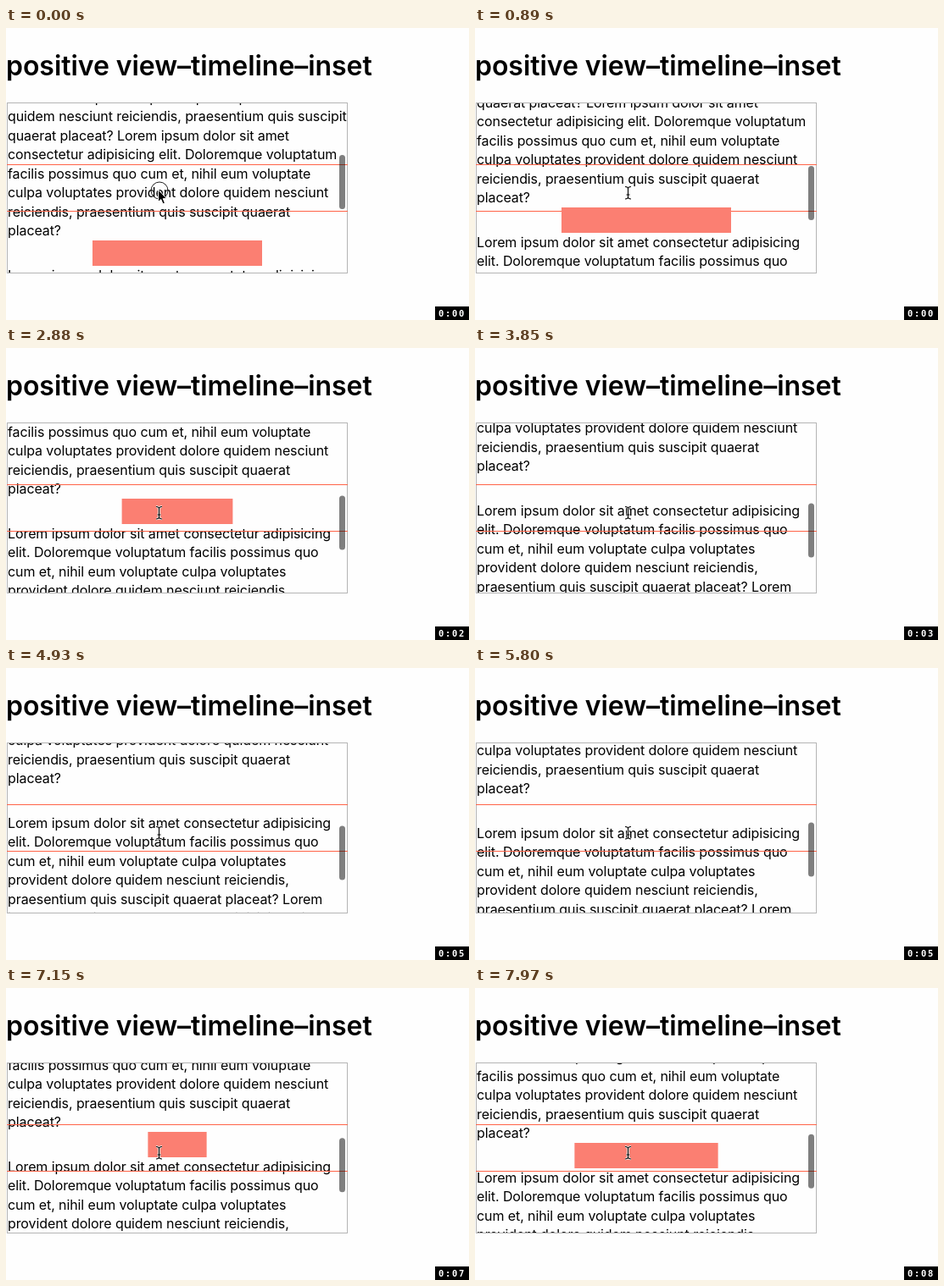
Recreate the animation shown at these times as an HTML page. Size 546 by 345 pixels, loop 8000 ms.

```html
<!DOCTYPE html>
<html lang="en">
<head>
<meta charset="utf-8">
<title>positive view-timeline-inset</title>
<style>
  html, body { margin: 0; width: 100%; height: 100%; overflow: hidden; background: #fefefe; }
  svg { display: block; }
  text { font: 16px Inter, sans-serif; letter-spacing: -.09px; fill: #000; white-space: pre; }
  .title { font-size: 32px; font-weight: 600; letter-spacing: -.05px; }
  .clock { font: bold 10.5px "DejaVu Sans Mono", monospace; letter-spacing: 1.68px; fill: #fff; }
</style>
</head>
<body>
<svg width="546" height="345" viewBox="0 0 546 345">
  <defs>
    <clipPath id="port"><rect x="2" y="89" width="400" height="200"/></clipPath>
    <path id="beamShape" d="M177 187.5Q180.5 187.5 180.5 190Q180.5 187.5 184 187.5M180.5 189.5V200M177 202Q180.5 202 180.5 199.5Q180.5 202 184 202M178.5 197H182.5"/>
  </defs>
  <text class="title" x="0" y="56">positive view–timeline–inset</text>

  <g clip-path="url(#port)"><g id="content"></g></g>
  <rect x="1.5" y="88.5" width="401" height="201" fill="none" stroke="#b4b4b4"/>
  <path d="M1 161.5H403M1 216.5H403" stroke="#ff6347"/>
  <g clip-path="url(#port)"><rect id="subject" height="30" fill="#fb7f72"/></g>
  <rect id="thumb" x="393" width="7" height="64" rx="3.5" fill="#000" fill-opacity=".5"/>

  <g id="pointer">
    <circle cx="181" cy="192" r="10" fill="none" stroke="#222"/>
    <path d="M179.5 191V205.5L182.8 202.5L185 207.8L187.4 206.8L185.2 201.6H189.6Z" stroke="#fff"/>
  </g>
  <g id="beam" fill="none">
    <use href="#beamShape" stroke="#fff" stroke-width="2.6"/>
    <use href="#beamShape" stroke="#000" stroke-width="1.1"/>
  </g>

  <rect x="506" y="329" width="40" height="16"/>
  <text class="clock" id="clock" x="510" y="341"></text>
</svg>
<script>
const LOOP = 8000, LINE = 22.5, START_TOP = 251;
const byId = id => document.getElementById(id);

const before = [
  "nihil eum voluptate culpa voluptates provident dolore",
  "quidem nesciunt reiciendis, praesentium quis suscipit",
  "quaerat placeat? Lorem ipsum dolor sit amet",
  "consectetur adipisicing elit. Doloremque voluptatum",
  "facilis possimus quo cum et, nihil eum voluptate",
  "culpa voluptates provident dolore quidem nesciunt",
  "reiciendis, praesentium quis suscipit quaerat",
  "placeat?"
];
const after = [
  "Lorem ipsum dolor sit amet consectetur adipisicing",
  "elit. Doloremque voluptatum facilis possimus quo",
  "cum et, nihil eum voluptate culpa voluptates",
  "provident dolore quidem nesciunt reiciendis,",
  "praesentium quis suscipit quaerat placeat? Lorem",
  "ipsum dolor sit amet consectetur adipisicing elit."
];

// Baselines are relative to the top edge of the subject.
function addLines(lines, firstBaseline) {
  lines.forEach((line, i) => {
    const text = document.createElementNS("http://www.w3.org/2000/svg", "text");
    text.setAttribute("x", 2);
    text.setAttribute("y", firstBaseline + i * LINE);
    text.textContent = line;
    byId("content").append(text);
  });
}
addLines(before, -6 - (before.length - 1) * LINE);
addLines(after, 46.5);

// Scroll bursts: start, end, resting top of the subject.
const bursts = [
  [50, 490, 224], [730, 1200, 204], [1440, 1690, 197], [1900, 2350, 189],
  [2680, 2950, 177], [3430, 3970, 150], [4210, 4400, 137], [4820, 5130, 145],
  [5340, 5590, 152], [5800, 6130, 163], [6370, 6480, 166], [6780, 6910, 169],
  [7150, 7280, 173], [7610, 7970, 183]
];
const STEP = 30;

function subjectTop(t) {
  let top = START_TOP;
  for (const [start, end, rest] of bursts) {
    if (t < start) break;
    const p = Math.min(1, (t - start + STEP) / (end - start + STEP));
    top += (rest - top) * (1 - (1 - p) ** 2);
  }
  return Math.round(top);
}

function draw(t) {
  const top = subjectTop(t);
  const width = 200 * Math.max(0, Math.min(1, (top - 161) / 26));
  byId("content").setAttribute("transform", `translate(0 ${top})`);
  byId("subject").setAttribute("x", 202 - width / 2);
  byId("subject").setAttribute("y", top);
  byId("subject").setAttribute("width", width);
  byId("thumb").setAttribute("y", 150 + (START_TOP - top) * .335);
  byId("pointer").style.display = t < 50 ? "" : "none";
  byId("beam").style.display = t < 50 ? "none" : "";
  byId("clock").textContent = "0:0" + Math.floor((t + 95) / 1000);
}

const origin = performance.now();
function tick() {
  draw((performance.now() - origin) % LOOP);
  requestAnimationFrame(tick);
}
draw(0);
tick();
</script>
</body>
</html>
```
